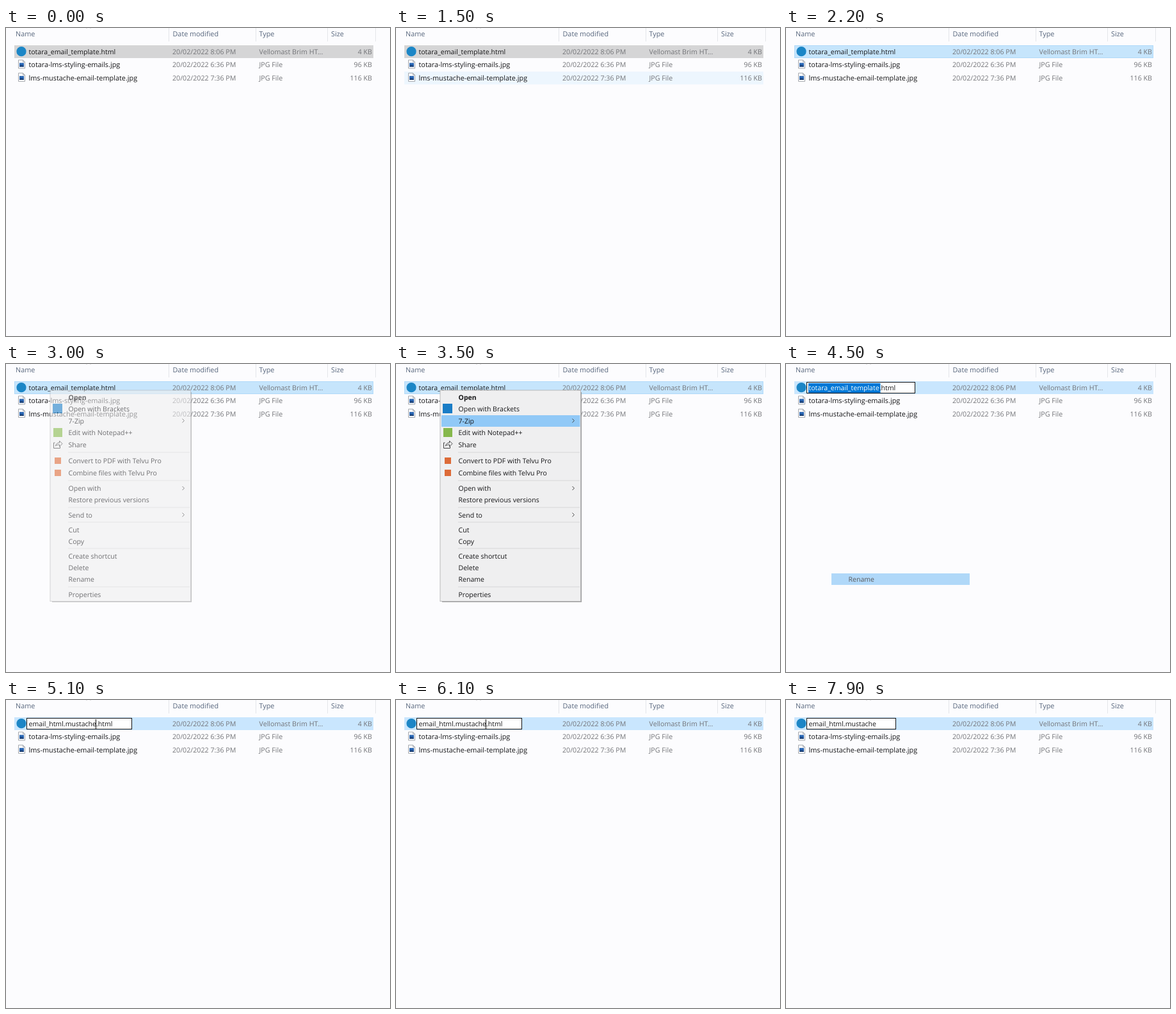
These frames come from a looping animation (600x481 px, 8 s). An HTML page:

```html
<!DOCTYPE html>
<html lang="en">
<head>
<meta charset="utf-8">
<title>Renaming a file</title>
<style>
  html, body { margin: 0; width: 100%; height: 100%; overflow: hidden; background: #fcfcfe; }
  svg { display: block; width: 600px; height: 481px; }
  text { font: 10.56px "Open Sans", "Noto Sans", sans-serif; fill: #161618; text-rendering: geometricPrecision; white-space: pre; }
  .head { font-size: 10.8px; fill: #56657c; }
  .info { font-size: 10.68px; fill: #737478; }
  .long { font-size: 10.86px; }
  .end { text-anchor: end; }
  .menu text { font-size: 10.55px; }
  .menu .bold { font-weight: 700; }
  .line { fill: none; stroke: #e4e5ea; }
  .menu .line { stroke: #d6d6d8; }
  .icon { fill: none; stroke: #444; }
</style>
</head>
<body>
<svg viewBox="0 0 600 481" xmlns="http://www.w3.org/2000/svg">
  <defs>
    <g id="picture">
      <path d="M19.5 50h7l3 3v10h-10z" fill="#fff" stroke="#a3a6ac"/>
      <path d="M26.5 50v3h3" fill="none" stroke="#a3a6ac"/>
      <path d="M21 54.5h7v6h-7z" fill="#2a66b3"/>
      <path d="M21 60.5l2.500-3 2 1.500 1-1 1.500 2.500z" fill="#1a3a6b"/>
    </g>
  </defs>
  <path class="line" d="M254.5 0v21M390.5 0v21M502.5 0v21M577.5 0v21"/>
  <path d="M126 .5l3-3 3 3" fill="none" stroke="#999"/>
  <g id="heads"></g>
  <rect id="hover" x="13" width="561" height="20" fill="#e5f3ff"/>
  <rect id="row" x="13.5" y="27.5" width="560" height="19"/>
  <circle cx="24" cy="36.7" r="7.6" fill="#1c86c6"/>
  <use href="#picture"/>
  <use href="#picture" y="20.4"/>
  <g id="files"></g>
  <g id="edit">
    <rect id="box" x="32.5" y="28.5" height="17" fill="#fff" stroke="#111"/>
    <rect id="mark" x="35" y="30" width="112.5" height="15" fill="#0078d7"/>
  </g>
  <text x="35.5" y="41"><tspan id="stem"></tspan><tspan id="ext"></tspan></text>
  <path id="caret" d="M140.5 30v15" stroke="#111"/>
  <g id="menu" class="menu">
    <path d="M72 371.2h217.3V44" fill="none" stroke="#8b8b8b" stroke-width="1.6" opacity=".8"/>
    <rect x="69" y="41" width="219.5" height="329.500" fill="#efeff0" stroke="#b9b9ba"/>
    <rect id="pick" x="71" width="216.5" height="18" fill="#91c9f7"/>
    <rect x="73" y="62" width="15" height="15" fill="#1a7dc6"/>
    <rect x="74" y="100" width="14" height="14" fill="#86b84c"/>
    <path class="icon" d="M76.5 123h-2v8.500h10v-3M77.500 128c.5-3.500 3-5 6-5v-3l4.500 4.500-4.500 4.500v-3c-3 0-4.500.5-6 2z"/>
    <rect x="76" y="146" width="10" height="10" fill="#dd6b38"/>
    <rect x="76" y="165" width="10" height="10" fill="#dd6b38"/>
    <g id="items"></g>
  </g>
  <g id="ghost" class="menu">
    <rect x="71" y="327" width="216" height="18" fill="#91c9f7"/>
    <text x="97.5" y="340">Rename</text>
  </g>
</svg>
<script>
const LOOP = 8000;
const $ = id => document.getElementById(id);

function add(parent, tag, attrs, text = '') {
  const el = document.createElementNS('http://www.w3.org/2000/svg', tag);
  for (const key in attrs) el.setAttribute(key, attrs[key]);
  el.textContent = text;
  $(parent).append(el);
}
const label = (parent, x, y, text, cls = '') => add(parent, 'text', { x, y, class: cls }, text);

[[15, 'Name'], [260.5, 'Date modified'], [395.5, 'Type'], [508, 'Size']]
  .forEach(([x, text]) => label('heads', x, 12.7, text, 'head'));

[['', '8:06', 'Vellomast Brim HT...', '4'],
 ['totara-lms-styling-emails.jpg', '6:36', 'JPG File', '96'],
 ['lms-mustache-email-template.jpg', '7:36', 'JPG File', '116']].forEach(([name, time, type, size], i) => {
  const y = 41 + i * 20.3;
  label('files', 35.5, y, name, 'long');
  label('files', 260, y, `20/02/2022 ${time} PM`, 'info');
  label('files', 395.5, y, type, 'info');
  label('files', 572, y, size + ' KB', 'info end');
});

// Centre line of each menu entry
const items = {
  'Open': 52, 'Open with Brackets': 70.5, '7-Zip': 89, 'Edit with Notepad++': 107.3, 'Share': 126,
  'Convert to PDF with Telvu Pro': 151, 'Combine files with Telvu Pro': 170.5,
  'Open with': 194.5, 'Restore previous versions': 212.7, 'Send to': 236,
  'Cut': 259, 'Copy': 277.3, 'Create shortcut': 300.3, 'Delete': 318.5, 'Rename': 336.4, 'Properties': 360
};
for (const name in items) {
  const y = items[name];
  label('items', 97.5, y + 3.5, name, name === 'Open' ? 'bold' : '');
  if (['7-Zip', 'Open with', 'Send to'].includes(name))
    add('items', 'path', { class: 'icon', d: `M275.5 ${y - 3.5}l3 3-3 3` });
}
[138, 182, 224, 247, 288, 348]
  .forEach(y => add('items', 'path', { class: 'line', d: `M97 ${y}h190` }));

// Each step is [start, value]; the latest one reached applies
const at = (t, steps) => steps.reduce((value, [start, next]) => t >= start ? next : value, null);
const show = (id, opacity) => $(id).setAttribute('opacity', +opacity);

function draw(t) {
  const editing = t >= 4500, pasted = t >= 4800;

  const hoverRow = at(t, [[1500, 2], [1900, 1], [2000, null]]);
  show('hover', hoverRow === null ? 0 : t < 1600 ? .6 : 1);
  $('hover').setAttribute('y', 27.3 + 20.4 * (hoverRow || 0));
  const [fill, stroke] = at(t, [
    [0, ['#d5d5d6', '#d5d5d6']], [2000, ['#d5d5d6', '#b0d8f6']],
    [2100, ['#c6e5fc', '#b0d9f9']], [4500, ['#c9e6fe', '#c9e6fe']]
  ]);
  $('row').setAttribute('fill', fill);
  $('row').setAttribute('stroke', stroke);

  show('menu', at(t, [[0, 0], [3000, .6], [3100, 1], [4500, 0]]));
  const picked = at(t, [
    [3200, 'Open'], [3300, 'Open with Brackets'], [3400, '7-Zip'], [3600, 'Share'],
    [3700, 'Convert to PDF with Telvu Pro'], [3800, 'Open with'], [3900, 'Copy'],
    [4000, 'Delete'], [4100, 'Rename']
  ]);
  show('pick', picked !== null);
  if (picked) $('pick').setAttribute('y', Math.round(items[picked] - 9));
  show('ghost', at(t, [[0, 0], [4500, .7], [4600, .35], [4700, 0]]));

  // One character of the extension goes every 200 ms
  const cut = Math.max(0, Math.floor((t - 6900) / 200));
  $('stem').textContent = pasted ? 'email_html.mustache' : 'totara_email_template';
  $('stem').style.fill = editing && !pasted ? '#fff' : '';
  $('ext').textContent = '.html'.slice(cut);
  show('edit', editing);
  show('mark', !pasted);
  const length = $('stem').parentNode.getComputedTextLength();
  $('box').setAttribute('width', Math.round(length + 34.5) - 1);
  show('caret', t >= 5100 && Math.floor((t - 5100) / 500) % 2 === 0);
}

function tick() {
  draw(performance.now() % LOOP);
  requestAnimationFrame(tick);
}
tick();
</script>
</body>
</html>
```
